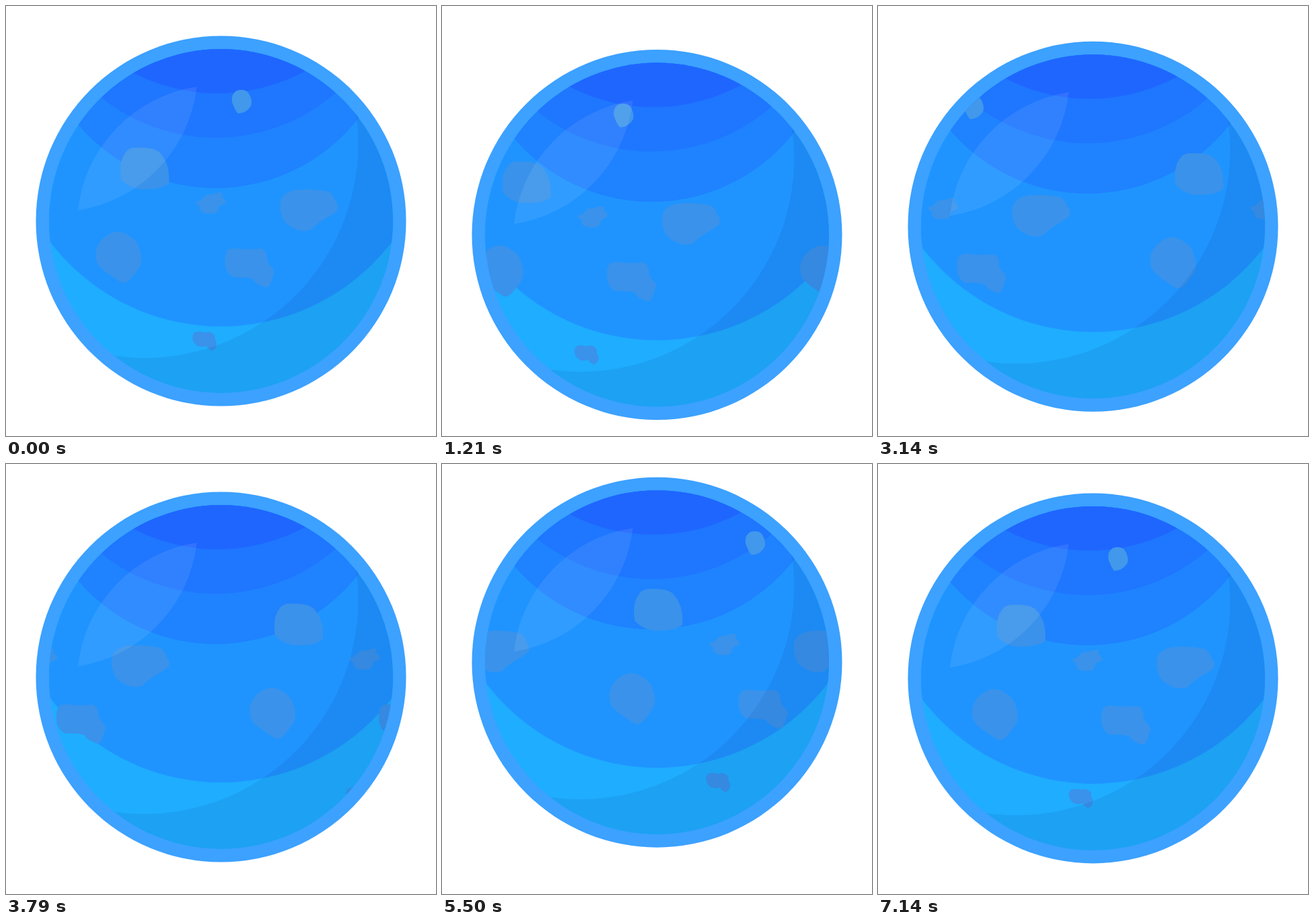
An HTML page that plays this animation: 640 by 640 pixels, repeating every 7210 ms.

```html
<!DOCTYPE html>
<html lang="en">
<head>
<meta charset="utf-8">
<title>Blue planet</title>
<style>
  html, body { margin: 0; width: 100%; height: 100%; overflow: hidden; background: #fff; }
  svg { display: block; width: 100%; height: 100%; }
</style>
</head>
<body>
<svg viewBox="0 0 640 640">
  <defs>
    <clipPath id="disc"><circle cx="320" cy="320" r="256"/></clipPath>
    <g id="spots" fill="#3a92ea">
      <path fill="#4298ea" d="M344 126Q358 122 363 132Q368 142 365 149Q358 160 346 160Q342 157 337 143Q335 131 344 126z"/>
      <path d="M190 211Q222 209 230 219Q245 235 243 264Q232 273 207 273Q186 273 172 258Q168 232 178 219Q182 212 190 211z"/>
      <path d="M283 291Q290 292 298 281Q305 281 309 280L320 277Q324 279 322 284Q329 289 328 293Q322 296 318 298Q317 306 313 308Q300 311 293 307Q288 304 289 298Q283 295 283 291z"/>
      <path d="M430 274Q455 271 480 276Q489 282 490 289Q497 297 494 304Q488 310 478 315Q460 326 455 333Q447 336 436 334Q420 328 413 318Q406 300 410 288Q415 277 430 274z"/>
      <path d="M160 337Q172 334 182 341Q196 349 198 358Q205 375 200 387Q184 412 176 412Q172 412 164 406Q140 391 136 382Q131 364 140 352Q148 341 160 337z"/>
      <path d="M331 363Q335 360 345 361Q365 363 380 361Q390 364 389 378Q391 384 398 391Q401 397 398 401Q396 412 391 418Q387 420 382 417Q371 413 368 406Q356 403 340 404Q330 400 327 388Q325 368 331 363z"/>
      <path d="M281 486Q286 483 297 486Q304 483 309 488Q313 490 311 495Q315 500 314 506Q310 513 307 513Q301 511 299 506Q290 509 284 505Q278 500 278 491z"/>
    </g>
  </defs>
  <g id="planet">
    <circle cx="320" cy="320" r="275.5" fill="#3ca1ff"/>
    <g clip-path="url(#disc)">
      <rect width="640" height="640" fill="#1fadff"/>
      <circle cx="320" cy="157" r="320" fill="#1f94ff"/>
      <circle cx="312" cy="2" r="269" fill="#1f82ff"/>
      <circle cx="312" cy="-76" r="272" fill="#1f76ff"/>
      <circle cx="315" cy="-142" r="272" fill="#1f66ff"/>
      <g id="drift">
        <use href="#spots"/>
        <use href="#spots" x="480"/>
      </g>
      <!-- shadow: everything outside the lit circle -->
      <path fill="rgb(0,30,100)" fill-opacity=".08" fill-rule="evenodd"
        d="M0 0H640V640H0zM-112 206a318 318 0 0 0 636 0a318 318 0 0 0 -636 0z"/>
      <path fill="#fff" fill-opacity=".08" d="M284 120A210 210 0 0 0 107 304A210 210 0 0 0 284 120z"/>
    </g>
  </g>
</svg>
<script>
const LOOP = 7210, STEPS = 101, STEP_MS = LOOP / STEPS;
const planet = document.getElementById('planet');
const drift = document.getElementById('drift');

// Cubic Bezier ease (1/6, 1/6, 2/3, 1): linear start, soft end.
function easeOut(u) {
  let lo = 0, hi = 1;
  for (let i = 0; i < 24; i++) {
    const s = (lo + hi) / 2;
    if (0.5 * s + s * s - 0.5 * s ** 3 < u) lo = s; else hi = s;
  }
  return u + lo * lo * (1 - lo);
}

// Down, back, up, back: each quarter eases towards or away from its extreme.
function bob(phase) {
  const half = phase % 0.5 * 4;
  return (phase < 0.5 ? 25 : -25) * easeOut(half < 1 ? half : 2 - half);
}

function draw(now) {
  // Steps begin on times rounded to 10 ms.
  const step = Math.floor((now % LOOP + 5) / STEP_MS) % STEPS;
  planet.setAttribute('transform', `translate(0 ${bob(step / STEPS)})`);
  drift.setAttribute('transform', `translate(${-0.6 - 4.735 * step} 0)`);
}

let start;
function tick(now) {
  start ??= now;
  draw(now - start);
  requestAnimationFrame(tick);
}
draw(0);
requestAnimationFrame(tick);
</script>
</body>
</html>
```
